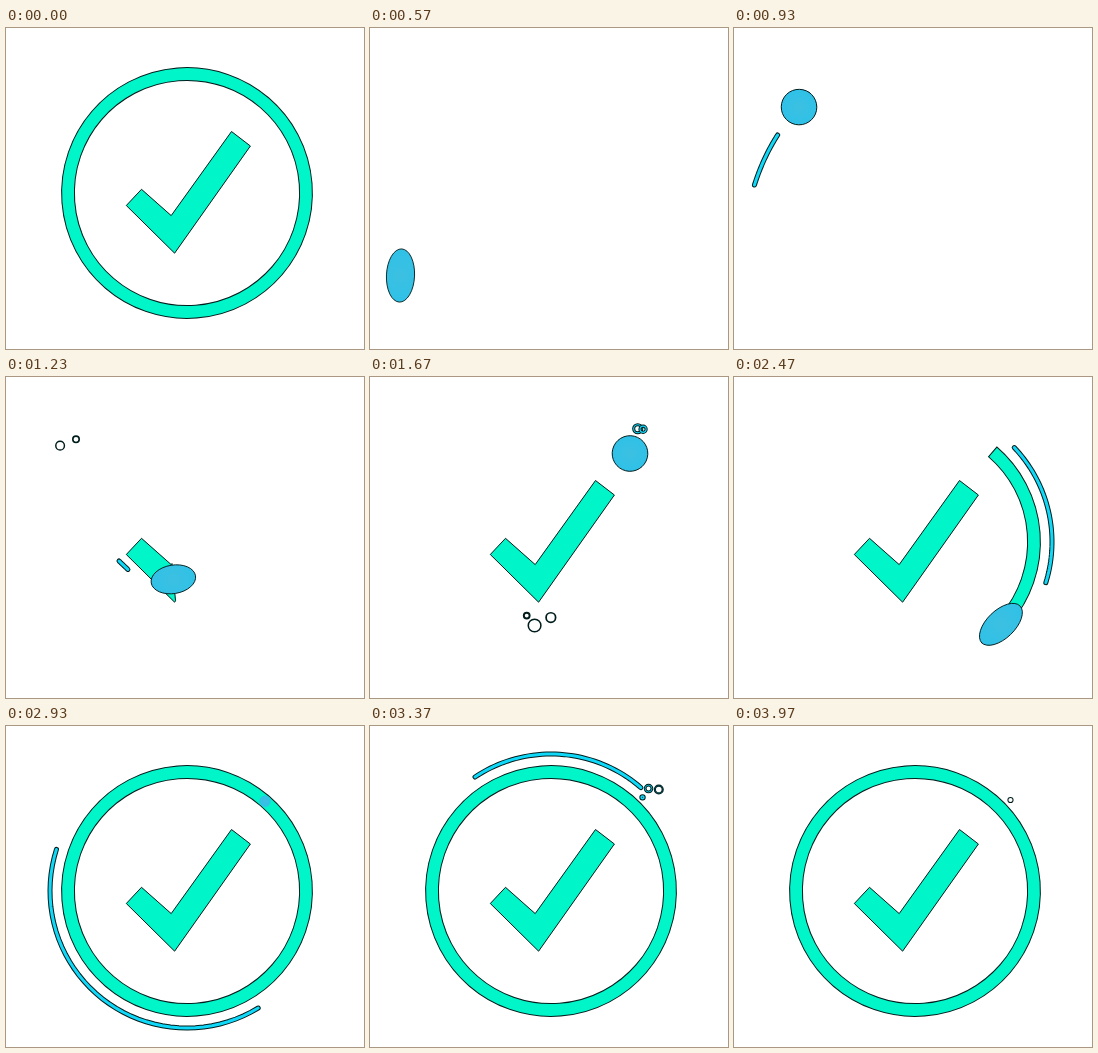
Recreate the animation shown at these times as an HTML page with a canvas. Size 358 by 321 pixels, loop 4.01 s.

```html
<!DOCTYPE html>
<html lang="en">
<head>
<meta charset="utf-8">
<title>Success check</title>
<style>
  html, body { margin: 0; width: 100%; height: 100%; overflow: hidden; background: #fff; }
  canvas { display: block; }
</style>
</head>
<body>
<canvas id="stage" width="358" height="321"></canvas>
<script>
const ctx = document.getElementById('stage').getContext('2d');
const LOOP = 4010, MINT = '#00f5c8', CYAN = '#10d8f8', EDGE = '#001c1c';
const CENTER = [181, 165], RING_R = 119, START = -49 * Math.PI / 180, TURN = Math.PI * 2;
const LEG_A = [128, 169.5], VERTEX = [166.7, 206.3], REST = [260, 76.5], APEX = [68, 75];
// Both sides of the check mark: left end, bend, right end
const INNER = [[135.5, 161.3], [165.2, 187.6], [225.5, 103.5]];
const OUTER = [[120.3, 177.5], [168.6, 225.2], [244.4, 118]];

// born, life, start x/y, end x/y, radius
const bubbles = [
  [960, 450, 60, 72, 53, 68, 4.7],
  [990, 450, 70, 67, 70, 61, 3.6],
  [1280, 700, 167, 230, 164, 253, 7],
  [1330, 700, 172, 228, 184, 245, 5.5],
  [1400, 650, 162, 230, 154, 243, 3.5],
  [1580, 680, 265, 54, 276, 45, 6.5],
  [1590, 660, 268, 55, 290, 43, 5],
  [3220, 440, 274, 68, 300, 60, 5],
  [3240, 650, 272, 64, 290, 60, 5],
  [3330, 680, 272, 71, 276.5, 74, 2.6]
];

const span = (t, from, to) => Math.min(1, Math.max(0, (t - from) / (to - from)));
const easeOut = u => 1 - (1 - u) ** 2;
const mix = (a, b, u) => a + (b - a) * u;
const lerp = (a, b, u) => [mix(a[0], b[0], u), mix(a[1], b[1], u)];
const bezier = (a, c, b, u) => lerp(lerp(a, c, u), lerp(c, b, u), u);
const onCircle = (r, a) => [CENTER[0] + r * Math.cos(a), CENTER[1] + r * Math.sin(a)];
const ringTurn = t => span(t, 2240, 2880) ** 1.33;
const firstLeg = t => span(t, 1186, 1229);
const secondLeg = t => easeOut(span(t, 1229, 1660));

function ballAt(t) {
  if (t < 1030) return bezier([30, 345], [25, 130], APEX, easeOut(span(t, 500, 1030)));
  if (t < 1186) return bezier(APEX, [88, 131], LEG_A, span(t, 1030, 1186) ** 1.7);
  if (t < 1229) return lerp(LEG_A, [166.5, 203.5], firstLeg(t));
  if (t < 2240) return lerp([166.5, 203.5], REST, secondLeg(t));
  return onCircle(RING_R, START + TURN * ringTurn(t));
}

// Strokes a path with a thin dark border; the border pass extends open ends by pad.
function outlined(trace, width, color, cap = 'butt') {
  ctx.lineCap = cap;
  const pass = (lineWidth, style, pad) => {
    ctx.beginPath();
    trace(pad);
    ctx.lineWidth = lineWidth;
    ctx.strokeStyle = style;
    ctx.stroke();
  };
  pass(width + 1, EDGE, 0.008);
  if (width > 1) pass(width - 1, color, 0);
}

function polyline(points) {
  points.forEach((p, i) => i ? ctx.lineTo(...p) : ctx.moveTo(...p));
}

function drawTrail(pointAt, tail, head) {
  if (head - tail < 0.005) return;
  const points = Array.from({ length: 41 }, (_, i) => pointAt(mix(tail, head, i / 40)));
  outlined(() => polyline(points), 4, CYAN, 'round');
}

function drawCheck(t) {
  const first = t < 500 ? 1 : firstLeg(t);
  if (first === 0) return;
  const second = t < 500 ? 1 : Math.min(1, secondLeg(t) * 1.37);
  const side = ([end, bend, tip]) => first < 1
    ? [end, lerp(end, bend, first)]
    : [end, bend, lerp(bend, tip, second)];
  ctx.beginPath();
  polyline([...side(INNER), ...side(OUTER).reverse()]);
  ctx.closePath();
  ctx.fillStyle = MINT;
  ctx.fill();
  ctx.strokeStyle = EDGE;
  ctx.lineWidth = 1;
  ctx.stroke();
}

function drawRing(t) {
  const turn = t < 500 ? 1 : ringTurn(t);
  if (turn === 0) return;
  outlined(pad => ctx.arc(...CENTER, RING_R, START - pad, START + TURN * turn), 12.8, MINT);
}

function drawBall(t) {
  const radius = 17.8 * (1 - span(t, 2880, 2955));
  if (t < 500 || radius < 0.5) return;
  const [x, y] = ballAt(t), a = ballAt(t - 16), b = ballAt(t + 24);
  const dx = b[0] - a[0], dy = b[1] - a[1];
  const speed = t < 2880 ? Math.max(0, Math.hypot(dx, dy) / 40 - 0.12) : 0;
  const rx = radius * (1 + 0.55 * Math.min(0.9, speed));
  const ry = radius * (1 - 0.21 * Math.min(1, speed * 2));
  ctx.save();
  ctx.translate(x, y);
  ctx.rotate(Math.atan2(dy, dx));
  const fill = ctx.createRadialGradient(0, 0, 0, 0, 0, rx);
  fill.addColorStop(0, '#3cc0e1');
  fill.addColorStop(1, '#2fc1e8');
  ctx.beginPath();
  ctx.ellipse(0, 0, rx, ry, 0, 0, TURN);
  ctx.fillStyle = fill;
  ctx.fill();
  if (t < 2880) {
    ctx.strokeStyle = EDGE;
    ctx.lineWidth = 0.9;
    ctx.stroke();
  }
  ctx.restore();
}

function drawBubble(t, [born, life, x0, y0, x1, y1, size]) {
  const age = (t - born) / life;
  if (age <= 0 || age >= 1) return;
  const u = easeOut(age);
  const r = size * mix(0.5, 1, u);
  outlined(() => ctx.arc(mix(x0, x1, u), mix(y0, y1, u), r, 0, TURN), 2.8 * (1 - u), CYAN);
}

function draw(t) {
  ctx.fillStyle = '#fff';
  ctx.fillRect(0, 0, 358, 321);
  drawRing(t);
  drawCheck(t);
  drawTrail(u => bezier([8, 230], [12, 148], [52, 95], u),
    span(t, 800, 1000) ** 1.7, span(t, 680, 962));
  drawTrail(u => lerp([113, 184], [152, 221], u), span(t, 1270, 1400), span(t, 1215, 1285));
  drawTrail(u => onCircle(137, START + TURN * u),
    span(t, 2380, 3520) ** 1.66, span(t, 2302, 3220));
  bubbles.forEach(b => drawBubble(t, b));
  drawBall(t);
}

const began = performance.now();
function frame() {
  draw((performance.now() - began) % LOOP);
  requestAnimationFrame(frame);
}
frame();
</script>
</body>
</html>
```
